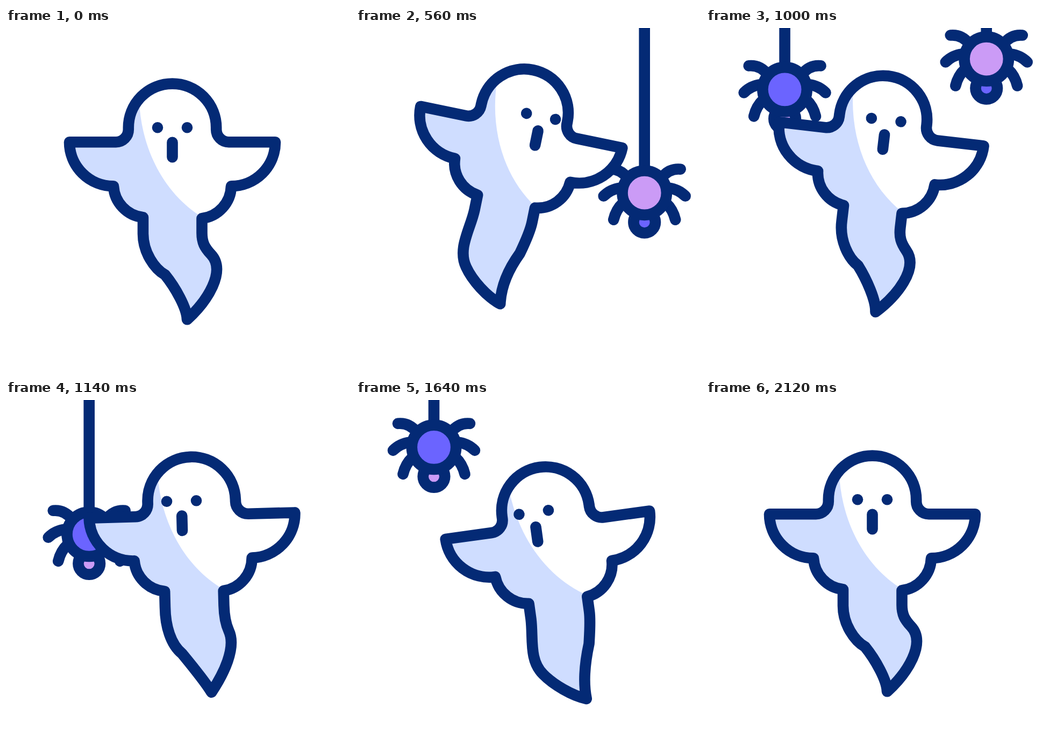
Animation of 640x640 px, one loop 2.4 s. Source, as an HTML page:

```html
<!DOCTYPE html>
<html lang="en">
<head>
<meta charset="utf-8">
<title>Ghost and spiders</title>
<style>
  html, body { margin: 0; width: 100%; height: 100%; overflow: hidden; background: #fff; }
  svg { display: block; width: 100%; height: 100%; }
  .line { stroke: #042a75; stroke-width: 20.6; stroke-linecap: round; stroke-linejoin: round; }
</style>
</head>
<body>
<svg viewBox="0 0 640 640">
  <defs>
    <clipPath id="inside"><path class="body"/></clipPath>
    <g id="legs" fill="none">
      <path d="M67 -44Q46 -46 32 -28M76 6Q63 -7 45 -9M57.5 50Q53 31 40 19"/>
    </g>
    <g id="spider" class="line">
      <path d="M0 -500V0" stroke-linecap="butt"/>
      <use href="#legs"/>
      <use href="#legs" transform="scale(-1 1)"/>
      <circle cy="54.5" r="20.3" fill="var(--tail)"/>
      <circle r="41.2" fill="var(--belly)"/>
    </g>
  </defs>
  <use href="#spider" id="right" style="--belly:#cb9bf6;--tail:#6b64ff"/>
  <use href="#spider" id="left" style="--belly:#6b64ff;--tail:#cb9bf6"/>
  <g id="ghost">
    <path class="body" fill="#cfddff"/>
    <path clip-path="url(#inside)" fill="#fff"
      d="M-62 -80C-58 20 -10 100 56 140L250 150V-150H-62Z"/>
    <path class="body line" fill="none"/>
    <g id="face">
      <circle cx="-27.5" cy="-27" r="10.3" fill="#042a75"/>
      <circle cx="27.5" cy="-27" r="10.3" fill="#042a75"/>
      <path class="line" d="M0 .5V28"/>
    </g>
  </g>
</svg>
<script>
const LOOP = 2400;
const $ = id => document.getElementById(id);
const bodies = document.querySelectorAll('.body');

// 0 to 1 with soft ends, between two times
function ease(t, from, to) {
  const u = Math.min(1, Math.max(0, (t - from) / (to - from)));
  return u * u * (3 - 2 * u);
}

// k swings the tail from curled (0) to swept (1); each point slides along (dx, dy)
function bodyPath(k) {
  const at = (x, y, dx, dy) => `${x + dx * k} ${y + dy * k} `;
  const leftKnee = at(-13.5, 247, -35.5, 29);
  const rightKnee = at(72, 209, -28, 22);
  const tail =
    'C-55 205 ' + at(-33, 236, -39, 9) + leftKnee +
    'C' + at(5, 270, -38, 28) + at(27, 308, -27, 14) + '27.5 330' +
    'C' + at(65, 296, -43, 4) + at(101, 240, -73, 25) + rightKnee +
    'C' + at(60, 196, -11, 16) + '55 187 55 169';
  return `M-54.5 140V169${tail}V142A62 62 0 0 0 109.5 82A82 82 0 0 0 191.5 0
    H105A23.5 23.5 0 0 1 81.7 -23.5V-27A81.7 81.7 0 0 0 -81.7 -27V-23.5
    A23.5 23.5 0 0 1 -105 0H-191.5A82 82 0 0 0 -109.5 82A62 62 0 0 0 -54.5 140Z`;
}

function placeSpider(id, x, down) {
  const y = -100 + 416 * down;
  $(id).setAttribute('transform', `translate(${x + y * .06} ${y})`);
}

function draw(now) {
  const t = now % LOOP;

  // The ghost leans to one spider, crosses to the other, then returns
  const across = ease(t, 795, 1400);
  const x = -23.5 * ease(t, 0, 430) + 103.5 * across - 80 * ease(t, 1450, 2065);
  const y = -30 * ease(t, 0, 525) + 53 * across - 23 * ease(t, 1480, 2120);
  const tilt = 11.65 * (ease(t, 0, 580) - 2 * ease(t, 830, 1402) + ease(t, 1420, 2000));
  const look = 36 * (ease(t, 99, 690) - 2 * ease(t, 735, 1331) + ease(t, 1430, 1930));
  const wave = ease(t, 0, 480) - ease(t, 530, 940) + ease(t, 940, 1460) - ease(t, 1540, 2120);

  const d = bodyPath(wave);
  bodies.forEach(b => b.setAttribute('d', d));
  $('ghost').setAttribute('transform',
    `translate(${309.5 + x} ${320.3 + y}) rotate(${tilt}) translate(0 -108)`);
  $('face').setAttribute('transform', `translate(${look})`);
  placeSpider('right', 518.3, ease(t, 0, 616) - ease(t, 780, 1160));
  placeSpider('left', 139.7, ease(t, 700, 1290) - ease(t, 1460, 1800));
  requestAnimationFrame(() => draw(performance.now()));
}
draw(0);
</script>
</body>
</html>
```
